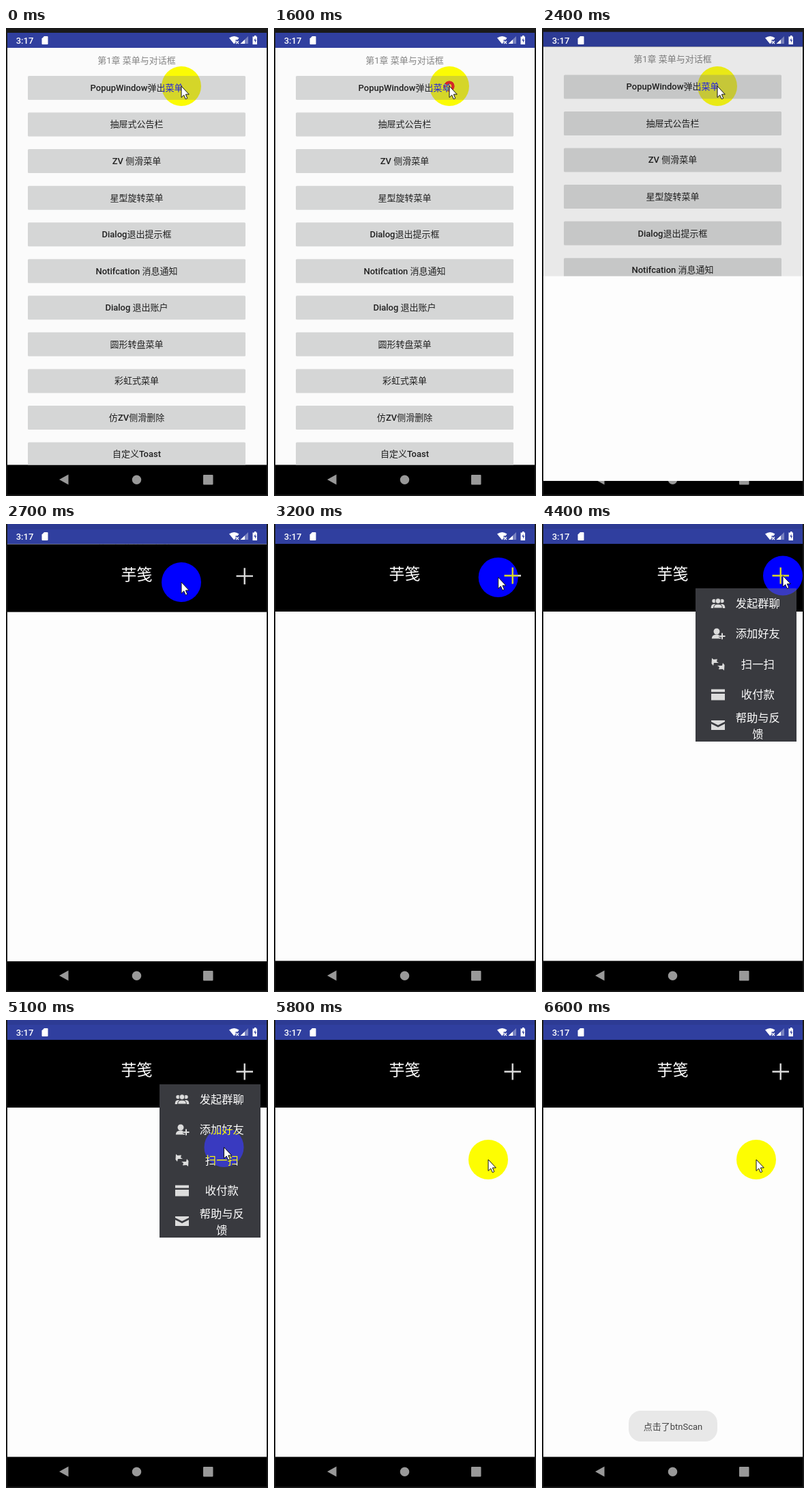
An HTML page for the animation above (6900 ms loop, 384x684 px).

```html
<!DOCTYPE html>
<html lang="zh-CN">
<head>
<meta charset="utf-8">
<title>弹出菜单</title>
<style>
html, body { margin: 0; width: 100%; height: 100%; overflow: hidden; background: #1a1a1a; }
svg { display: block; width: 384px; height: 684px; isolation: isolate; }
text { font-family: Roboto, "Noto Sans CJK SC", "Noto Sans CJK", sans-serif; text-anchor: middle; }
.medium { font-weight: 500; }
#halo { mix-blend-mode: difference; }
</style>
</head>
<body>
<svg id="stage" viewBox="0 0 384 684"></svg>
<script>
const LOOP = 6900, STEP = 100;
const PAGE = '#fbfbfb', BAR = '#303f9f', PANEL = '#393a3f', ICON = '#dcdcdc';
const LABELS = ['PopupWindow弹出菜单', '抽屉式公告栏', 'ZV 侧滑菜单', '星型旋转菜单', 'Dialog退出提示框',
  'Notifcation 消息通知', 'Dialog 退出账户', '圆形转盘菜单', '彩虹式菜单', '仿ZV侧滑删除', '自定义Toast'];
const ITEMS = ['发起群聊', '添加好友', '扫一扫', '收付款', '帮助与反'];

const rect = (x, y, w, h, fill, more = '') =>
  `<rect x="${x}" y="${y}" width="${w}" height="${h}" fill="${fill}" ${more}/>`;
// Text centred on (x, cy)
const label = (str, x, cy, size, fill) =>
  `<text x="${x}" y="${cy + size * 0.36}" font-size="${size}" fill="${fill}">${str}</text>`;
const mediumLatin = s => s.replace(/[A-Za-z]+/g, '<tspan class="medium">$&</tspan>');

const person = (x, r) =>
  `<circle cx="${x}" cy="-3.5" r="${r}"/><path d="M${x - r * 1.6} 7q0-6 ${r * 1.6}-6t${r * 1.6} 6z"/>`;
const arrow = 'M-9-9l2.5 2l5.5-.5l-1 3.5l3 2h-7l-1 4l-2.5-3z';
const plus = 'M6-1v9M1.5 3.5h9';
const ICONS = [
  person(-6, 2.7) + person(6, 2.7) + `<g stroke="${PANEL}">${person(0, 4)}</g>`,
  person(-2, 4.5) + `<path d="${plus}" stroke="${PANEL}" stroke-width="4"/><path d="${plus}" stroke="${ICON}" stroke-width="2"/>`,
  `<path d="${arrow}"/><path d="${arrow}" transform="rotate(180)"/>`,
  '<path d="M-10-8h20v4h-20zM-10-1.5h20v9.5h-20z"/>',
  '<path d="M-10-7h20v2l-10 5l-10-5zM-10-2l10 5l10-5v9h-20z"/>'
];

const buttons = LABELS.map((s, i) => {
  const y = 70 + i * 53.55;
  return rect(32, y, 319, 35, '#d5d6d6', 'rx="1.5"') +
    (i ? '' : '<circle id="ripple" cx="257" cy="86" clip-path="url(#firstButton)"/>') +
    label(mediumLatin(s), 191.5, y + 17.2, 13, '#212121');
}).join('');

const rows = ITEMS.map((s, i) => {
  const y = 116 + i * 44.5, wraps = i === 4;
  return `<g transform="translate(258 ${y})" fill="${ICON}">${ICONS[i]}</g>` +
    label(s, 316.3, wraps ? y - 11 : y, 16.3, '#fff') + (wraps ? label('馈', 316.3, y + 13, 16.3, '#fff') : '');
}).join('');

document.getElementById('stage').innerHTML = `
<defs>
  <clipPath id="screen">${rect(2, 7, 380, 631.5, '#000')}</clipPath>
  <clipPath id="firstButton">${rect(32, 70, 319, 35, '#000', 'rx="1.5"')}</clipPath>
  <clipPath id="reveal"><rect id="revealBox" x="2" width="380" height="684"/></clipPath>
</defs>
${rect(0, 0, 384, 684, '#1a1a1a')}
${rect(2, 638, 380, 44, '#000')}
<g fill="#999">
  <path d="M78 660l13.5-7.5v15z"/><circle cx="191.500" cy="660.300" r="6.700"/>
  <rect x="289" y="653" width="14.500" height="14.500" rx="1"/>
</g>
<g id="menu" clip-path="url(#screen)">
  ${rect(2, 7, 380, 22, BAR)}
  ${rect(2, 29, 380, 610, PAGE)}
  ${label('第1章 菜单与对话框', 191.5, 47, 13, '#858585')}
  ${buttons}
  <rect id="dim" width="384" height="684"/>
</g>
<g id="chat" clip-path="url(#reveal)"><g id="chatBody">
  ${rect(2, 7, 380, 22, BAR)}
  ${rect(2, 29, 380, 609.5, '#fdfdfd')}
  ${rect(2, 29, 380, 99, '#000')}
  ${label('芋笺', 191.5, 73, 23, '#fff')}
  <path d="M337.500 75.500h24.500M349.700 63.500v24" stroke="${ICON}" stroke-width="2.400"/>
</g></g>
<g id="popup">${rect(225, 94, 148, 224, PANEL)}${rows}</g>
<g id="toast">${rect(127, 571, 130, 45, '#e8e8e8', 'rx="18"')}${label('点击了btnScan', 192, 594, 13, '#444')}</g>
<g fill="#fff">
  <text class="medium" x="27.500" y="22.500" font-size="13">3:17</text>
  <path d="M56 12h4.500q1 0 1 1v10q0 1-1 1h-7q-1 0-1-1v-7.500z"/>
  <path d="M327 14.500q7.500-5 14.500 0l-2 2.800h-3v4l-2.300 2z"/>
  <path d="M337 19l4 4m0-4l-4 4" stroke="#fff" stroke-width="1.200"/>
  <path d="M355 12v11h-11.500z" opacity=".35"/><path d="M350 17v6h-6.500z"/>
  <path d="M363 12.500h1v-1.500h2.500v1.500h1.500v11.500h-6.500v-11.500z"/>
  <path d="M365.500 14.500l-2.200 4h1.700v3l2.200-4h-1.700z" fill="${BAR}"/>
</g>
<g id="halo">
  <circle r="29" fill="#00f"/>
  <circle id="ring" fill="none" stroke="#0ff" stroke-width="4"/>
</g>
<path id="cursor" d="M0 0V16.500L3.700 13L6.200 18.800L8.800 17.700L6.300 12H11.300z" fill="#fff" stroke="#111"/>`;

const el = {};
document.querySelectorAll('svg [id]').forEach(n => el[n.id] = n);
const set = (node, attrs) => { for (const k in attrs) node.setAttribute(k, attrs[k]); };

// Progress from 0 to 1 after a start time
const linear = (t, start, length) => Math.min(1, Math.max(0, (t - start) / length));
const easeOut = (t, start, length, power = 2) => 1 - (1 - linear(t, start, length)) ** power;
const smooth = (t, start, length) => { const u = linear(t, start, length); return u * u * (3 - 2 * u); };

function draw(t) {
  // Menu press, then the next page rises over the dimmed menu
  set(el.ripple, { r: 230 * linear(t, 1600, 400), opacity: 0.1 * (1 - linear(t, 1900, 300)) });
  const slide = smooth(t, 2300, 440);
  set(el.menu, { transform: `translate(0 ${-12 * slide})` });
  set(el.dim, { opacity: 0.07 * linear(t, 2300, 100) });
  set(el.chat, { visibility: t >= 2300 ? 'visible' : 'hidden' });
  set(el.revealBox, { y: 640 * (1 - easeOut(t, 2300, 300, 1.4)) });
  set(el.chatBody, { transform: `translate(0 ${27 * (1 - slide)})` });

  const grow = easeOut(t, 3800, 400, 1.55);
  set(el.popup, {
    opacity: grow * (1 - linear(t, 5600, 200)),
    transform: `translate(298 94) scale(${0.9 + 0.1 * grow}) translate(-298 -94)`
  });
  set(el.toast, { opacity: easeOut(t, 5800, 800) });

  // Pointer: menu button, plus sign, popup row
  const toPlus = easeOut(t, 2700, 800, 1.4), toRow = easeOut(t, 4600, 800);
  const move = `translate(${257 + 96 * toPlus - 39 * toRow} ${85 - 9.5 * toPlus + 128.5 * toRow})`;
  set(el.halo, { transform: move });
  set(el.cursor, { transform: move });
  const age = t - (t < 5400 ? 1600 : 5400);
  set(el.ring, { r: 5.5 + Math.max(0, age) * 0.03, visibility: age >= 0 && age < 300 ? 'visible' : 'hidden' });
}

const start = performance.now();
function tick() {
  const t = (performance.now() - start) % LOOP;
  draw(Math.floor(t / STEP) * STEP);
  requestAnimationFrame(tick);
}
tick();
</script>
</body>
</html>
```
